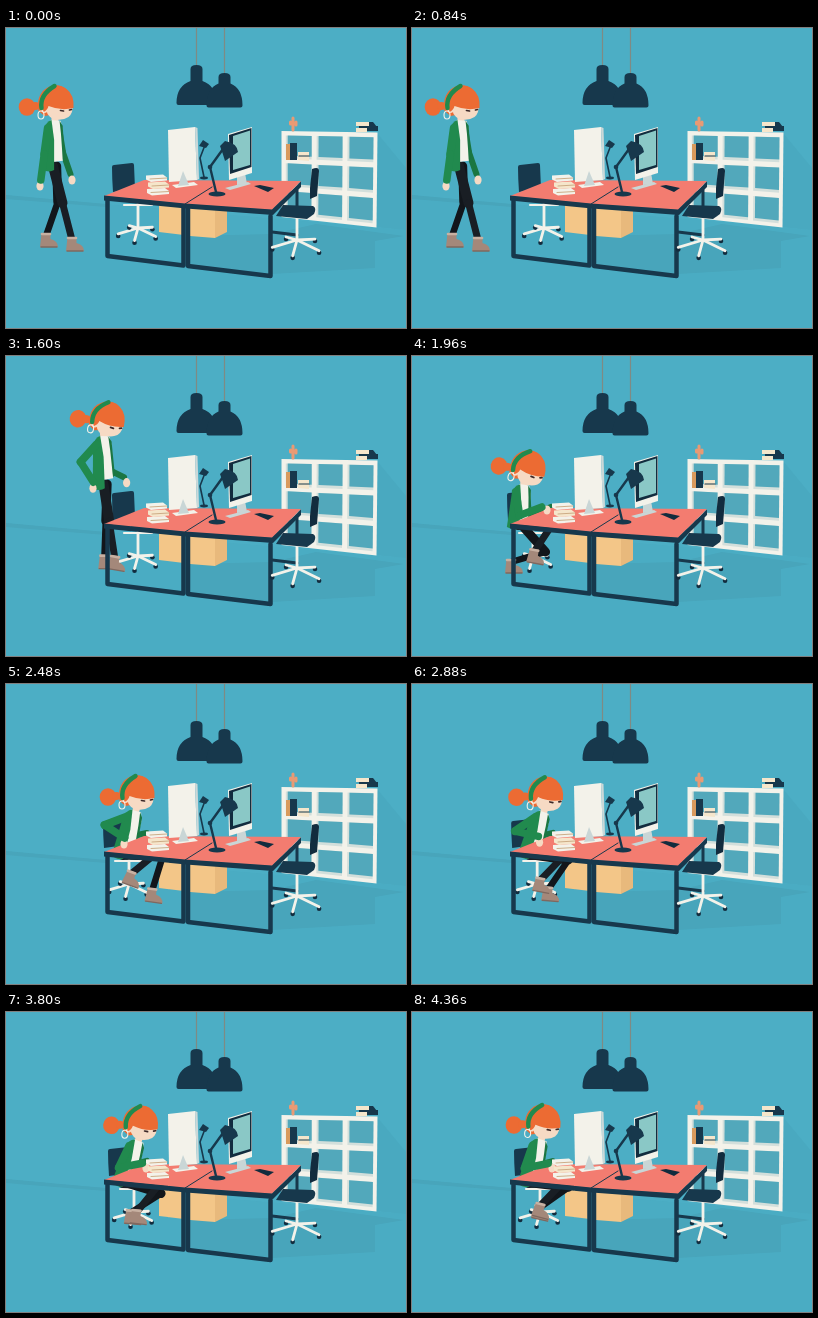
Animation, 400 px wide and 300 px high, one loop 4400 ms. Source, as an HTML page:

```html
<!DOCTYPE html>
<html lang="en">
<head>
<meta charset="utf-8">
<title>Taking a seat at the office</title>
<style>
html, body { margin: 0; width: 100%; height: 100%; overflow: hidden; background: #4caec5; }
svg { display: block; width: 100vw; height: 100vh; }
</style>
</head>
<body>
<svg id="stage" viewBox="0 0 400 300"></svg>
<script>
const LOOP = 4400;
const NAVY = '#17384c', DARK = '#122c3e', CORAL = '#f37c70', WHITE = '#f3f2ea', GREY = '#c9d6d6';
const YELLOW = '#f3c688', CREAM = '#f5e6cb', GREEN = '#218a4e', MOSS = '#1b7642', ORANGE = '#ec6b33';
const SKIN = '#f6dac4', PANTS = '#191e24', BOOT = '#a4887a', SHADE = '#48a5bb';

const poly = (fill, points) => `<polygon fill="${fill}" points="${points}"/>`;
const path = (fill, d) => `<path fill="${fill}" d="${d}"/>`;
const line = (color, width, d) =>
  `<path fill="none" stroke="${color}" stroke-width="${width}" stroke-linecap="round" stroke-linejoin="round" d="${d}"/>`;
const dot = (fill, x, y, rx, ry = rx) => `<ellipse fill="${fill}" cx="${x}" cy="${y}" rx="${rx}" ry="${ry}"/>`;
const group = (id, body) => `<g id="${id}">${body}</g>`;

const room = () =>
  poly('#4aacc3', '0,167 100,176 400,202 400,300 0,300') +
  poly(SHADE, '0,167 100,176 100,179 0,171') +
  poly('#49a9c0', '371,105 400,140 400,202 370,199') +
  poly(SHADE, '183,208 266,206 310,196 398,208 369,213 369,240 266,246 183,237');

const pendant = (x, top, bottom, half) =>
  line('#7f8a84', 1.2, `M${x},0 V${top}`) +
  path(NAVY, `M${x - 6},${top + 4} q0,-4 6,-4 q6,0 6,4 V${bottom - 24}
    Q${x + half},${bottom - 19} ${x + half},${bottom - 2} q0,2 -2,2 H${x - half + 2} q-2,0 -2,-2
    Q${x - half},${bottom - 19} ${x - 6},${bottom - 24}Z`);

function shelf() {
  const at = (u, v) => [275.5 + 96 * u - u * v, 103 + 1.5 * u + v * (86 + 9 * u)].map(n => n.toFixed(1)).join();
  const quad = (fill, l, t, r, b) => poly(fill, [at(l, t), at(r, t), at(r, b), at(l, b)].join(' '));
  let out = quad(WHITE, 0, 0, 1, 1);
  for (let cell = 0; cell < 9; cell++) {
    const l = .045 + cell % 3 * .322, t = .05 + Math.floor(cell / 3) * .322, r = l + .27, b = t + .265;
    out += quad('#d3dfdb', l, t, r, b) + quad('#52a8bb', l + .02, t, r, b - .03);
  }
  return out;
}

const shelfItems = () =>
  poly('#d99a5c', '280,116 284,116 284,132 280,132') + poly(NAVY, '284,115 291,115 291,132 284,132') +
  poly(CREAM, '292,124 303,124 303,133 292,132') + line(NAVY, 1.2, 'M293,128 H303') +
  line('#e99a74', 3, 'M287,102 V90 M284.5,96 V94 M290,97 V94') +
  poly(NAVY, '350,94 367,94 371,99 350,98') + poly(CREAM, '350,94 363,94 363,98 350,98') +
  poly(NAVY, '353,98 372,98 372,103 353,103') + poly(CREAM, '350,100 361,100 361,104 350,104');

// Five spokes on a flattened circle below the hub.
function starBase(x, y, rx, ry) {
  let out = '';
  for (let k = 0; k < 5; k++) {
    const a = (100 + 72 * k) * Math.PI / 180;
    const wx = x + rx * Math.cos(a), wy = y + ry * (.6 + Math.sin(a));
    out += dot(DARK, wx, wy + 2, 2.3) + line(WHITE, 2.8, `M${x},${y} L${wx},${wy}`);
  }
  return out + line(WHITE, 2.8, `M${x},${y - 24} V${y}`);
}

const leftChair = () =>
  path(NAVY, 'M108,137 L126,135 Q128,135 128,137 L129,161 107,164 Q106,150 106,139 Q106,137 108,137Z') +
  line(WHITE, 2.2, 'M118,177 H146') + starBase(132, 200, 20, 8);

const rightChair = () =>
  starBase(291, 212, 25, 10) +
  line(WHITE, 1.6, 'M309,168 L306,186') +
  path(NAVY, 'M277,177 L307,178 Q311,180 308,186 L301,191 270,188Z') +
  path(DARK, 'M306,141 Q313,138 313,143 L311,168 304,171 304,160Z');

const boxes = () =>
  poly(YELLOW, '153,177 178,178 178,207 153,204') +
  poly(YELLOW, '184,179 209,181 209,210 184,208') + poly('#e8b97c', '209,181 221,178 221,204 209,210');

const deskFrame = (left, right, topY, bottomY, drop) =>
  line(NAVY, 4.5, `M${left},${topY} V${bottomY} L${right},${bottomY + drop} V${topY + drop - 2}`);

const desk = () =>
  line(NAVY, 3, 'M266,204 L291,207 M291,162 V186') +
  deskFrame(101.5, 177.5, 171, 228, 9.5) + deskFrame(182, 264.5, 180, 238, 10) +
  poly(CORAL, '98,168 138,152 295,153 266,182 179,176') +
  poly(NAVY, '98,167.5 179,175.5 266,181.5 295,153.5 295,159 267,187 180,180.5 98,172.5') +
  line(NAVY, 1, 'M179,176 L206,159');

const monitors = () =>
  poly(WHITE, '166,157 188,154 192,157 170,160') +
  poly(WHITE, '162,102 189,99 191,152 163,154') + poly('#cbd8d8', '189,99 191.5,100 193,151 191,152') +
  poly(GREY, '177,143 183,157 172,158') +
  line(NAVY, 1.6, 'M198,149 L194,130 L199,117') + path(NAVY, 'M193,118 L197,112 203,116 200,120Z') +
  dot(NAVY, 198, 150, 4, 1.4) +
  poly(GREY, '231,146 239,145 241,156 231,157') + poly(GREY, '219,160 242,154 245,156 224,162') +
  poly(WHITE, '222,106 246,99 246,145 223,152') +
  poly(DARK, '223,107 245.5,100 245.5,139 224,146') + poly('#8ac8c6', '227,108 244,102.5 244,137 227,142') +
  poly(DARK, '248,158 254,157 268,160 262,164');

const deskLamp = () =>
  dot(NAVY, 211, 166, 8.5, 2.6) + line(NAVY, 2.4, 'M210,164 L204,139 L217,121') + dot(NAVY, 204, 139, 2.3) +
  path(NAVY, 'M214,118 L219,113 Q231,115 232,124 L219,133 Q217,126 214,118Z');

const book = (x, y, w, cover) =>
  path(cover, `M${x},${y + 1} l${w - 4},-1 l4,3 v3 l${5 - w},1.5 l-5,-2.5Z`) +
  line('#c9a67e', .9, `M${x + 4},${y + 4.5} L${x + w},${y + 3.5}`);
const books = () => book(141, 160, 22, WHITE) + book(142, 153.5, 21, CREAM) + book(140, 146.5, 21, WHITE);

const headParts = () =>
  dot(ORANGE, -28.5, 3, 8.3, 8.8) + dot(ORANGE, -20, 2, 4) +
  path(ORANGE, 'M-17,7 Q-20,-12 -5,-18 Q10,-22 16,-7 L17,4 0,10 -11,12Z') +
  path(SKIN, 'M-10,0 H17 Q18,9 13,13 Q7,17 -2,15 Q-10,12 -10,0Z') + dot(SKIN, -11, 6, 3) +
  path(ORANGE, 'M-12,8 Q-8,6 -7,2 Q5,7 18,4 Q19,-9 11,-15 Q3,-21 -6,-17 Q-16,-10 -12,8Z') +
  line(GREEN, 4.4, 'M-14,4 Q-16,-9 -1,-18') +
  line('#3b2727', 1.7, 'M5,6.5 L8,7 M14,6 L16,5.5') +
  `<ellipse cx="-14.5" cy="11" rx="3" ry="4" fill="none" stroke="${WHITE}" stroke-width="1.1"/>`;

const clothes = () =>
  path(SKIN, 'M-2,-5 H5 V3 H-2Z') +
  path(WHITE, 'M-3,0 L7,1 9,10 8,41 -4,42Z') +
  path(GREEN, 'M-2,0 Q-9,2 -10,12 L-13,49 Q-6,53 -1,50 L0,20Z') +
  path(MOSS, 'M6,1 L9,6 10,38 8,40 7,14Z');

const boot = () =>
  path(BOOT, 'M-4.5,-3 H4.5 V3 Q12,5 12,11 H-6Z') + line('#c8b1a2', 2.6, 'M-4,-2 H4') +
  line('#7f685f', 1.3, 'M-5,11 H11');
const palm = () => dot(SKIN, 0, 0, 3.6, 4.6);
const limb = (id, color, upper, lower) => group(id, line(color, upper, '') + line(color, lower, ''));

const stage = document.getElementById('stage');
stage.innerHTML =
  room() + pendant(190.5, 37, 77, 20) + pendant(218.5, 45, 79.5, 18) + shelf() + shelfItems() + boxes() +
  group('chair', leftChair()) +
  limb('farSleeve', MOSS, 6.5, 6) + group('farPalm', palm()) +
  limb('farLeg', '#12161b', 9, 6.5) + group('farBoot', boot()) +
  limb('nearLeg', PANTS, 10, 7) + group('nearBoot', boot()) +
  group('torso', clothes()) + desk() + rightChair() +
  group('nearPalm', palm()) + limb('nearSleeve', GREEN, 8, 7.5) +
  group('head', headParts()) + monitors() + deskLamp() + books();

const parts = {};
stage.querySelectorAll('g[id]').forEach(g => parts[g.id] = g);

function ease(t, from, to) {
  const u = Math.min(1, Math.max(0, (t - from) / (to - from)));
  return u * u * (3 - 2 * u);
}

// A resting place plus weighted shifts of x, y and angle.
const shifted = (rest, ...shifts) =>
  rest.map((value, i) => shifts.reduce((sum, [weight, ...by]) => sum + weight * (by[i] || 0), value));

function poseAt(t) {
  const walk = ease(t, 870, 1310), step = ease(t, 1290, 1660), sit = ease(t, 1660, 1960);
  const settle = ease(t, 1960, 2480), work = ease(t, 2480, 3360), relax = ease(t, 3360, 4360);
  return {
    head: shifted([49.5, 76, 0], [walk, 39, 5, 22], [step, 13, -18, -14], [sit, 14, 50, 4],
      [settle, 15, -3, -12], [work, 6, 3, 5], [relax, -6, -2, -3]),
    hip: shifted([49, 138], [walk, 30, 5], [step, 22, -16], [sit, 7, 42], [settle, 11, 2]),
    farFoot: shifted([40, 208, 0], [walk, 50, -10, 12], [step, 9, 4, -12], [sit, 0, 4],
      [settle, 47, 1, 8], [work, -23, -3, -8], [relax, 4, -8, 12]),
    nearFoot: shifted([66, 212, 0], [step, 46, -10, 10], [sit, 10, -6], [settle, 3, -6, 10],
      [work, 7, 15, -20], [relax, -4, -11, 15]),
    farHand: shifted([66, 152], [walk, 36, -16], [step, 20, -10], [sit, 22, 28]),
    nearHand: shifted([34, 158], [walk, 39, 4], [step, 15, -32], [sit, 47, 24], [settle, -17, 6], [work, 22, -4]),
    chair: shifted([0, 0], [sit, -11], [settle, 2], [work, 5])
  };
}

const move = (id, [x, y, angle = 0], stretch = 1) =>
  parts[id].setAttribute('transform', `translate(${x} ${y}) rotate(${angle}) scale(1 ${stretch})`);

function attach([x, y, angle = 0], px, py) {
  const a = angle * Math.PI / 180, c = Math.cos(a), s = Math.sin(a);
  return [x + c * px - s * py, y + s * px + c * py];
}

// Two equal bones; bend 1 points the joint forward, -1 back.
function drawLimb(id, [ax, ay], [bx, by], bone, bend) {
  const dx = bx - ax, dy = by - ay, d = Math.hypot(dx, dy) || 1;
  const h = bend * Math.sqrt(Math.max(0, bone * bone - d * d / 4)) / d;
  const joint = `${(ax + bx) / 2 + dy * h},${(ay + by) / 2 - dx * h}`;
  const [upper, lower] = parts[id].children;
  upper.setAttribute('d', `M${ax},${ay} L${joint}`);
  lower.setAttribute('d', `M${joint} L${bx},${by}`);
}

function draw(t) {
  const pose = poseAt(t), hip = pose.hip;
  move('head', pose.head);
  move('chair', pose.chair);

  const neck = attach(pose.head, -2, 16);
  const dx = hip[0] - neck[0], dy = hip[1] - neck[1];
  const torso = [...neck, Math.atan2(dy, dx) * 180 / Math.PI - 90];
  move('torso', torso, Math.hypot(dx, dy) / 46);

  for (const [side, offset] of [['far', 5], ['near', -6]]) {
    const foot = pose[side + 'Foot'], hand = pose[side + 'Hand'], shoulder = attach(torso, offset, 8);
    const reach = Math.hypot(hand[0] - shoulder[0], hand[1] - shoulder[1]) || 1;
    const cuff = shoulder.map((v, i) => v + (hand[i] - v) * (1 - 6 / reach));
    drawLimb(side + 'Leg', [hip[0] + offset / 3, hip[1]], foot, 36, 1);
    drawLimb(side + 'Sleeve', shoulder, cuff, 24, -1);
    move(side + 'Boot', foot);
    move(side + 'Palm', hand);
  }
}

const start = performance.now();
function tick() {
  draw((performance.now() - start) % LOOP);
  requestAnimationFrame(tick);
}
tick();
</script>
</body>
</html>
```
